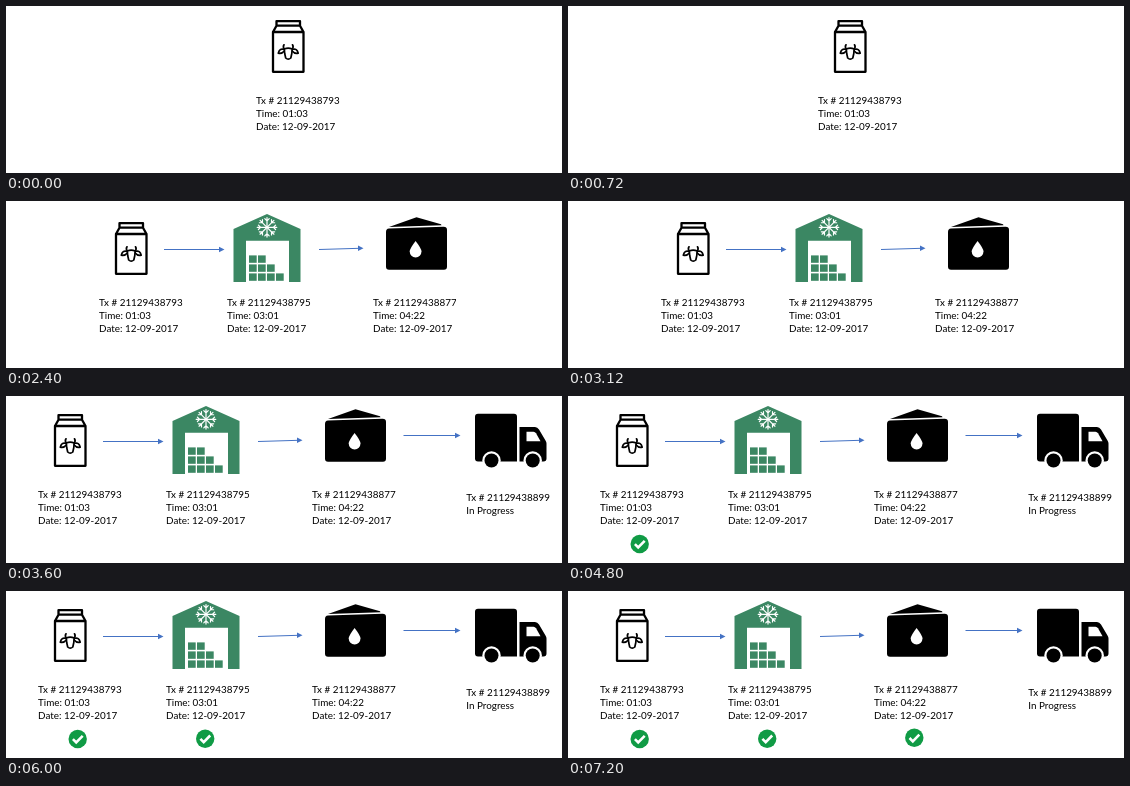
An HTML page that plays this animation: 556 by 167 pixels, repeating every 8 s.

```html
<!DOCTYPE html>
<html lang="en">
<head>
<meta charset="utf-8">
<title>Milk supply chain</title>
<style>
html, body { margin: 0; width: 100%; height: 100%; overflow: hidden; background: #fff; }
svg { display: block; width: 556px; height: 167px; }
text { font: 9.9px Lato, "Open Sans", sans-serif; fill: #000; white-space: pre; }
.arrow { fill: none; stroke: #4472c4; stroke-width: 1; }
.head { fill: #4472c4; }
.line { fill: none; stroke: #000; stroke-width: 2.3; stroke-linejoin: round; stroke-linecap: round; }
.thin { stroke-width: 1.7; }
.green { fill: #3b8763; }
.white { fill: #fff; }
.flake { fill: none; stroke: #fff; stroke-width: 1.2; stroke-linecap: round; }
</style>
</head>
<body>
<svg id="stage" viewBox="0 0 556 167">
  <defs>
    <g id="tick">
      <circle r="9.2" fill="#109b45"/>
      <path d="M-4.8 .2L-1.5 3.5L5-3.2" fill="none" stroke="#fff" stroke-width="2.6"/>
    </g>
    <path id="arm" class="flake" d="M0 0V-9.8M-2.2-8.6L0-6.4L2.2-8.6"/>
  </defs>
  <g id="chain">
    <g data-from="0">
      <path class="line" d="M52.5 19.2H76V23.7H52.5ZM52.5 23.7L49 30V69.8H79.5V30L76 23.7M49 30H79.5"/>
      <path class="line thin" d="M60.3 47Q64.2 45.2 68.2 47L67.8 51.5L66.8 56Q64.2 58.4 61.7 56L60.7 51.5ZM60.3 47Q58.6 45 60 42.8M68.2 47Q69.9 45 68.5 42.8"/>
      <path class="line thin" d="M60 47.3Q55.5 46 54.3 51.2Q58 52 60.3 49M68.5 47.3Q73 46 74.2 51.2Q70.5 52 68.2 49"/>
    </g>
    <g data-from="1" data-arrow="97 45.5 157.5 45.5">
      <path class="green" d="M166.5 25L200 10L233.5 25V78H222V36.8H179V78H166.5Z"/>
      <g id="flake" transform="translate(200 23.3)"></g>
      <g id="boxes" class="green"></g>
    </g>
    <g data-from="2" data-arrow="252 45.5 296.5 44.3">
      <path d="M322 23L349.5 13.2L374 20.2L374.5 21.2Z"/>
      <path d="M319 28Q319 24.8 322 24.6L376.5 22.8Q380 22.8 380 26V62.5Q380 65.7 377 65.7H322Q319 65.7 319 62.5Z"/>
      <path class="white" d="M348.6 37Q354.5 44.5 354.5 47.6A5.9 5.9 0 0 1 342.7 47.6Q342.7 44.5 348.6 37Z"/>
    </g>
    <g data-from="3" data-arrow="397.5 39.5 454.5 39.5">
      <path d="M472 17.8H508Q511 17.8 511 20.8V65.5H472Q469 65.5 469 62.5V20.8Q469 17.8 472 17.8ZM513.5 31H529Q531.5 31 533 33.5L539.5 44.5Q540.5 46 540.5 47.5V62.5Q540.5 65.5 537.5 65.5H513.5Z"/>
      <path class="white" d="M520.5 35.8H527.5Q529 35.8 530 37.3L534.5 45.3H520.5Z"/>
      <g id="wheels"></g>
    </g>
  </g>
</svg>
<script>
const stage = document.getElementById("stage");
const chain = document.getElementById("chain");
const steps = [...chain.querySelectorAll("[data-from]")];

const LINE_HEIGHT = 13.25;
const labels = [
  [32, 101.5, "Tx # 21129438793", "Time: 01:03", "Date: 12-09-2017"],
  [160, 101.5, "Tx # 21129438795", "Time: 03:01", "Date: 12-09-2017"],
  [306, 101.5, "Tx # 21129438877", "Time: 04:22", "Date: 12-09-2017"],
  [460.3, 104.5, "Tx # 21129438899", "In Progress"],
];
const ticks = [[71.7, 148], [199.2, 147.7], [346.3, 146.8]];
const offsets = [[218, -4], [134, 3], [61, 3], [0, 0]];

function add(parent, name, attributes, content = "") {
  const node = document.createElementNS("http://www.w3.org/2000/svg", name);
  for (const key in attributes) node.setAttribute(key, attributes[key]);
  node.textContent = content;
  return parent.appendChild(node);
}

steps.forEach((step, i) => {
  const [x, y, ...lines] = labels[i];
  lines.forEach((line, row) => add(step, "text", { x, y: y + row * LINE_HEIGHT }, line));
  if (!step.dataset.arrow) return;
  const [x1, y1, x2, y2] = step.dataset.arrow.split(" ").map(Number);
  add(step, "path", { class: "arrow", d: `M${x1} ${y1}L${x2 - 4} ${y2}` });
  add(step, "path", { class: "head", d: `M${x2} ${y2}l-5.5 -2.8v5.6Z` });
});

for (let i = 0; i < 8; i++)
  add(document.getElementById("flake"), "use", { href: "#arm", transform: `rotate(${i * 45})` });

for (let row = 0; row < 3; row++)
  for (let col = 0; col < row + 2; col++)
    add(document.getElementById("boxes"), "rect",
      { x: 182 + col * 9, y: 51.4 + row * 9, width: 7.7, height: 7.4 });

for (const cx of [485.5, 526.7]) {
  const wheels = document.getElementById("wheels");
  add(wheels, "circle", { cx, cy: 64.5, r: 9.2, class: "white" });
  add(wheels, "circle", { cx, cy: 64.5, r: 7 });
}

ticks.forEach(([x, y], i) =>
  steps.push(add(chain, "use", { href: "#tick", x, y, "data-from": i + 4 })));

function draw(now) {
  const scene = Math.floor((now % 8000) / 1200);
  const [dx, dy] = offsets[Math.min(scene, 3)];
  chain.setAttribute("transform", `translate(${dx} ${dy})`);
  steps.forEach(step => step.style.display = scene >= step.dataset.from ? "" : "none");
  // The third scene is cropped at its right edge.
  stage.style.clipPath = scene === 2 ? "inset(0 106px 0 0)" : "none";
  requestAnimationFrame(draw);
}
draw(0);
</script>
</body>
</html>
```
